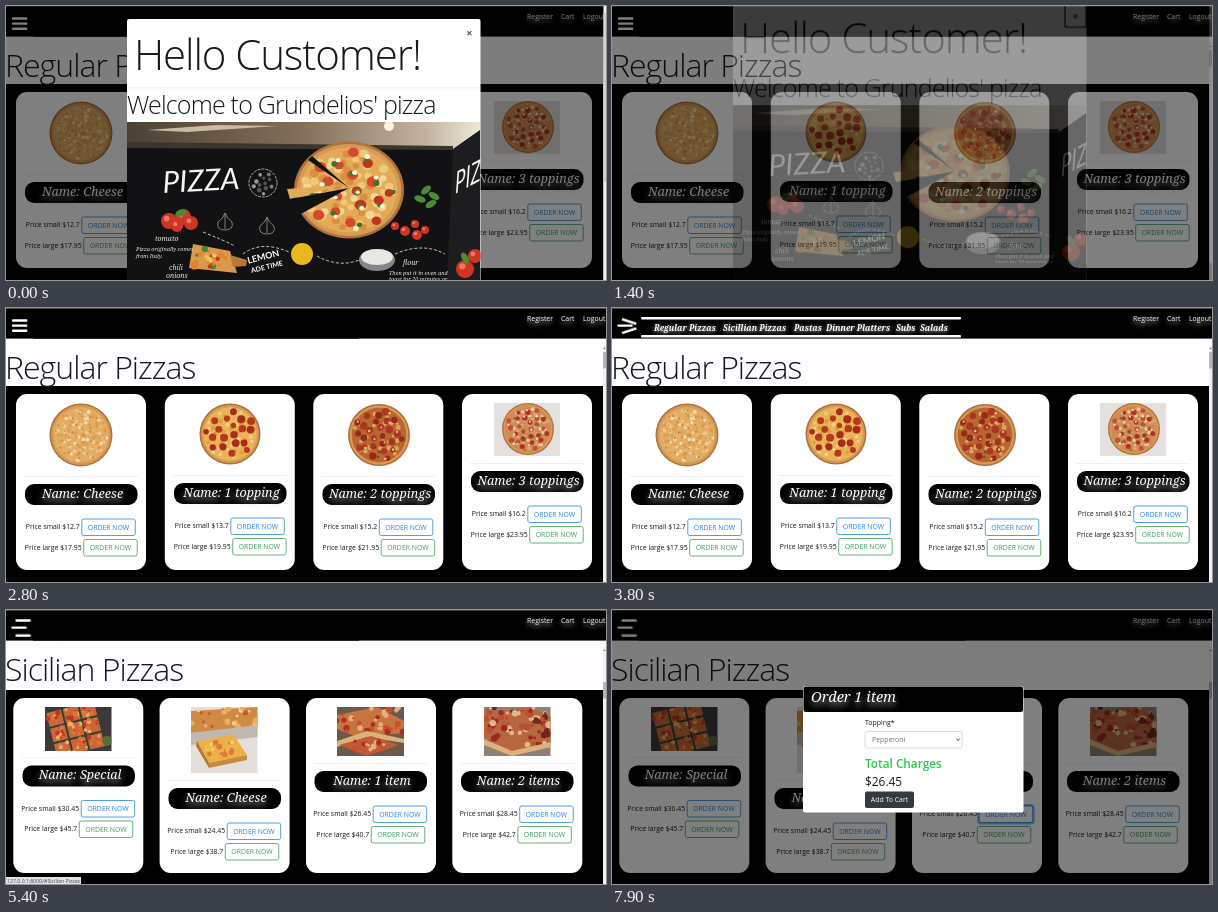
An HTML page that plays this animation: 600 px wide and 274 px high, repeating every 8 s.

```html
<!DOCTYPE html>
<html lang="en">
<head>
<meta charset="utf-8">
<title>Pizza menu</title>
<style>
html, body { margin: 0; width: 100%; height: 100%; overflow: hidden; background: #000; }
svg { display: block; }
#stage { width: 600px; height: 274px; }
text { font-family: "Open Sans", "Noto Sans", sans-serif; font-size: 6.9px; fill: #16191c; white-space: pre; }
.mid { text-anchor: middle; }
.end { text-anchor: end; }
.light { font-weight: 300; }
.title { font-size: 32px; letter-spacing: -1px; }
.script { font-family: "Noto Serif", serif; font-style: italic; font-size: 12.6px; fill: #fff; filter: drop-shadow(0 4px 3px #aaa); }
.menu { font-size: 8.1px; font-weight: 700; filter: drop-shadow(0 1px 2px #bbb); }
.link { fill: #fff; filter: drop-shadow(0 3px 2px #999); }
.chalk { font-family: "Noto Serif", serif; font-style: italic; font-size: 5.5px; fill: #e8e8e8; }
.sign { font: italic 30px Lato, sans-serif; fill: #f4f4f4; }
.bold { font: 700 9px Lato, sans-serif; fill: #fff; }

.anim { animation: 8s linear infinite; }
.step { animation: 8s step-end infinite; }
.bar, .cover { transform-box: fill-box; transform-origin: center; animation: 8s linear infinite; }
.cover { transform-origin: right; animation-name: cover; }
#regular { animation-name: first; }
#sicilian { animation-name: second; }
#thumb { animation-name: thumb; }
#status { animation-name: status; }
#hot { animation-name: hot; }
#ring { animation-name: ring; }
#shade { animation-name: shade; }
#welcome { animation-name: welcome; }
#focus { animation-name: focus; }
#order { animation-name: order; }
#bar0 { animation-name: bar0; }
#bar1 { animation-name: bar1; }
#bar2 { animation-name: bar2; }

@keyframes first { 0% { visibility: visible } 60%, 100% { visibility: hidden } }
@keyframes second { 0% { visibility: hidden } 60%, 100% { visibility: visible } }
@keyframes thumb { 0% { transform: none } 60%, 100% { transform: translateY(28px) } }
@keyframes status { 0% { opacity: 0 } 51.25% { opacity: 1 } 71.25%, 100% { opacity: 0 } }
@keyframes hot { 0% { opacity: 0 } 82.5% { opacity: 1 } 92.5%, 100% { opacity: 0 } }
@keyframes ring { 0% { opacity: 0 } 86.25%, 100% { opacity: 1 } }
@keyframes focus { 0% { opacity: 0 } 13.75%, 100% { opacity: 1 } }
@keyframes shade { 0%, 17.75% { opacity: .5 } 19.75%, 92.5% { opacity: 0 } 94.4%, 100% { opacity: .5 } }
@keyframes welcome {
  0%, 15.6% { opacity: 1; transform: none }
  18.1%, 100% { opacity: 0; transform: translateY(-22px) }
}
@keyframes order {
  0%, 93.1% { opacity: 0; transform: translateY(-22px); animation-timing-function: ease-out }
  96.9%, 100% { opacity: 1; transform: none }
}
@keyframes cover {
  0%, 37.5% { transform: none; animation-timing-function: ease }
  43.75%, 60% { transform: scaleX(0); animation-timing-function: ease }
  66.25%, 100% { transform: none }
}
@keyframes bar0 {
  0%, 37.5% { transform: none }
  43.75%, 60% { transform: translate(3.5px, 1px) rotate(18deg) }
  66.25%, 100% { transform: translate(3.5px, -2px) }
}
@keyframes bar1 { 0%, 37.5% { transform: none } 43.75%, 100% { transform: translateX(-.6px) } }
@keyframes bar2 {
  0%, 37.5% { transform: none }
  43.75%, 60% { transform: translate(3.5px, 0) rotate(-18deg) }
  66.25%, 100% { transform: translate(3.5px, 2.8px) }
}
</style>
</head>
<body>
<svg id="stage" viewBox="0 0 600 274"></svg>
<script>
let seed = 7;
const rnd = () => (seed = (seed * 16807) % 2147483647) / 2147483647;
const pick = list => list[Math.floor(rnd() * list.length)];
const many = (n, fn) => Array.from({ length: n }, (_, i) => fn(i)).join('');

const rect = (x, y, w, h, fill, more = '') =>
  `<rect x="${x}" y="${y}" width="${w}" height="${h}" fill="${fill}" ${more}/>`;
const dot = (x, y, r, fill, more = '') => `<circle cx="${x}" cy="${y}" r="${r}" fill="${fill}" ${more}/>`;
const poly = (points, fill) => `<polygon points="${points}" fill="${fill}"/>`;
const text = (x, y, str, cls = '', css = '') => `<text x="${x}" y="${y}" class="${cls}" style="${css}">${str}</text>`;
const frame = (x, y, w, h, body) => `<svg x="${x}" y="${y}" width="${w}" height="${h}">${body}</svg>`;
const put = (transform, body) => `<g transform="${transform}">${body}</g>`;

const spots = (n, w, h, r, colors) =>
  many(n, () => dot(rnd() * w, rnd() * h, r * (.5 + rnd()), pick(colors)));

// Toppings spread evenly over a disc
const scatter = (cx, cy, R, n, r, colors) => many(n, i => {
  const a = i * 2.4 + rnd() * .3, d = R * Math.sqrt((i + .5) / n);
  return dot(cx + d * Math.cos(a), cy + d * Math.sin(a), r * (.8 + rnd() * .4), pick(colors));
});

const pizza = (cx, cy, r, cheese, layers) =>
  dot(cx, cy, r, '#b0713a') + dot(cx, cy, r * .95, '#d59a55') + dot(cx, cy, r * .88, cheese) +
  layers.map(([n, size, ...colors]) => scatter(cx, cy, r * .82, n, size, colors)).join('');

const button = (x, y, color) =>
  rect(x, y, 53.5, 16.5, 'none', `rx="2" stroke="${color}" stroke-width=".8"`) +
  text(x + 26.75, y + 10.7, 'ORDER NOW', 'mid', `fill:${color}`);

const priceRow = (c, y, size, price, color) => {
  const x = c + (price.length > 5 ? 2.7 : .8);
  return text(x - 2, y + 2.2, `Price ${size} ${price}`, 'end') + button(x, y - 8, color);
};

const card = (x, y, h, c, pill, name, small, large, picture) =>
  rect(x, y, 130, h, '#fff', 'rx="11"') + picture +
  rect(x + 8, pill - 8, 114, .6, '#e6e6e6') +
  rect(c - 56, pill, 112.5, 21, '#000', 'rx="9"') +
  text(c + 1.5, pill + 13.5, 'Name: ' + name, 'mid script') +
  priceRow(c, pill + 43, 'small', small, '#2a86e0') +
  priceRow(c, pill + 63.5, 'large', large, '#3f9f5a');

const heading = (str, bottom) =>
  rect(0, 30, 600, bottom - 30, '#fdfcfe') + text(-1, 70.5, str, 'light title');

function regular() {
  const c = (x, mid, pill, ...rest) => card(x, 86, 176, mid, pill, ...rest);
  return heading('Regular Pizzas', 78) +
    c(10, 75, 176, 'Cheese', '$12.7', '$17.95',
      pizza(75, 127, 31.5, '#e2ac62', [[90, 1.7, '#ecc98a', '#dd9c50', '#f2dcae', '#e6b46b'], [40, .9, '#c9803a']])) +
    c(158.8, 224, 175, '1 topping', '$13.7', '$19.95',
      pizza(224, 126, 30.5, '#eab355', [[50, 1.8, '#f3d085', '#dd9a42'], [19, 3.4, '#b5381f', '#a82c1c']])) +
    c(307.3, 372.5, 176, '2 toppings', '$15.2', '$21.95',
      pizza(373, 127, 31, '#b9652f', [[40, 2.2, '#dca45e', '#bb6a35'], [26, 3.2, '#98271a', '#b03522'], [26, 1.2, '#54532b', '#e4c08a']])) +
    c(456, 521, 163, '3 toppings', '$16.2', '$23.95',
      rect(488, 95, 66, 53, '#e3e0de') +
      pizza(522, 121, 26, '#d08a55', [[40, 1.8, '#ebcda0', '#dca572'], [26, 2.3, '#b13224', '#bf5136'], [20, 1, '#5d6a35', '#f4e8d2']]));
}

function sicilian() {
  const c = (x, mid, pill, ...rest) => card(x, 88, 175, mid, pill, ...rest);
  const warm = ['#d9763a', '#b8391f', '#eab063'], red = ['#a9301f', '#c9502f', '#e3b080'];
  const tray = frame(39, 97, 66.5, 44, rect(0, 0, 67, 44, '#3c393b') +
    put('rotate(-14 33 22)', many(9, i => put(`translate(${6 + i % 3 * 17} ${-1 + Math.floor(i / 3) * 16})`,
      rect(0, 0, 15, 14, '#b9743a') + rect(1, 1, 13, 12, '#cf6434') + spots(9, 14, 13, 1.7, warm)))) +
    dot(62, 34, 5, '#5b6a3b'));
  const slice = frame(185, 97, 66.5, 66, rect(0, 0, 67, 66, '#e4dfdb') +
    poly('0,4 67,0 67,20 0,26', '#cf8a45') + spots(26, 67, 20, 2.2, ['#e8b060', '#c95a2c', '#eed09a']) +
    poly('0,26 67,18 67,30 0,38', '#c0b8b2') +
    poly('6,34 42,27 56,48 18,56', '#eab04a') + poly('6,34 18,56 18,61 5,39', '#b87432') +
    poly('18,56 56,48 56,53 18,61', '#c88a3f') +
    put('translate(15 33)', spots(22, 30, 17, 2, ['#f3cd72', '#dc7d35', '#f0b94e'])));
  const board = frame(331, 97, 67, 49, rect(0, 0, 67, 49, '#6b5a4b') + poly('0,8 40,0 67,14 67,26 20,30 0,22', '#c8743f') +
    spots(34, 67, 25, 2.3, red) + poly('0,34 30,24 67,32 67,36 30,30 0,40', '#ddb27a') +
    poly('2,38 34,29 62,38 30,49', '#c25a35') +
    put('translate(16 33)', spots(16, 34, 10, 2, red)));
  const loaded = frame(478, 97, 66.5, 49, rect(0, 0, 67, 49, '#8f7f74') + poly('0,6 46,0 67,10 67,36 28,46 0,30', '#b8663e') +
    spots(70, 67, 38, 2.4, ['#9a2a1e', '#73261c', '#e0b78f', '#b94f33']) +
    poly('0,32 28,44 67,35 67,40 28,49 0,38', '#dcb27e'));
  const hotX = 367.2, hotY = 196;
  return heading('Sicilian Pizzas', 80) +
    c(7.3, 72.5, 155.5, 'Special', '$30.45', '$45.7', tray) +
    c(153.6, 218.5, 178, 'Cheese', '$24.45', '$38.7', slice) +
    c(300, 364.5, 161, '1 item', '$26.45', '$40.7', board) +
    c(446.3, 511, 161, '2 items', '$28.45', '$42.7', loaded) +
    group('ring', 'step', rect(hotX - 1, hotY - 1, 55.5, 18.5, 'none', 'rx="3" stroke="#007bff" stroke-opacity=".5" stroke-width="2"')) +
    group('hot', 'step', rect(hotX, hotY, 53.5, 16.5, '#007bff', 'rx="2"') +
      text(hotX + 26.75, hotY + 10.7, 'ORDER NOW', 'mid', 'fill:#fff'));
}

function header() {
  const items = [[42, 'Regular Pizzas'], [111, 'Sicillian Pizzas'], [182, 'Pastas'],
    [214, 'Dinner Platters'], [284, 'Subs'], [308, 'Salads']];
  return rect(0, 0, 600, 30.6, '#000') + rect(0, 0, 600, .8, '#555') +
    rect(29, 9, 320, 2.6, '#fff', 'rx="1"') + rect(29, 27, 320, 2.6, '#fff', 'rx="1"') +
    items.map(([x, s]) => text(x, 22.5, s, 'script menu')).join('') +
    rect(27, 6, 326, 24.6, '#000', 'class="cover"') +
    many(3, i => rect(6, 11.3 + i * 5.1, 15.3, 2.4, '#fff', `rx=".8" class="bar" id="bar${i}"`)) +
    text(521, 13, 'Register', 'link') + text(555, 13, 'Cart', 'link') + text(577, 13, 'Logout', 'link');
}

function wall() {
  const black = '#121214';
  const tomato = (x, y, r) => dot(x, y, r, '#cf3524') + dot(x - r * .3, y - r * .3, r * .35, '#ee7a5e');
  const leaf = (x, y, a) => `<ellipse cx="${x}" cy="${y}" rx="6" ry="3.2" fill="#4c8a35" transform="rotate(${a} ${x} ${y})"/>`;
  const stroke = d => `<path d="${d}" fill="none" stroke="#ddd" stroke-width=".9" stroke-dasharray="3 2"/>`;
  const garlic = (x, y) => `<path d="M${x},${y - 9}q-2,6 -7,9q-2,8 7,8q9,0 7,-8q-5,-3 -7,-9v16" fill="none" stroke="#999" stroke-width=".8"/>`;
  const ceiling = '<linearGradient id="ceiling"><stop stop-color="#4c4135"/><stop offset=".5" stop-color="#83705b"/>' +
    '<stop offset=".85" stop-color="#c3b4a1"/><stop offset="1" stop-color="#efe8dc"/></linearGradient>';
  return ceiling + rect(0, 0, 353, 158, black) +
    poly('0,0 353,0 353,8 326,27 0,25', 'url(#ceiling)') + poly('0,20 326,24 326,28 0,26', '#3d342b') +
    poly('20,8 90,3 150,4 60,10', '#cbbba5') + dot(262, 4, 5, '#fff6e6') +
    poly('326,28 353,9 353,158 320,158', '#1d1d20') +
    put('rotate(-3 36 71)', text(36, 71, 'PIZZA', 'sign')) +
    put('translate(328 72) skewY(-28) scale(.62 1)', text(0, 0, 'PIZZA', 'sign')) +
    dot(136, 61, 14, 'none', 'stroke="#aaa" stroke-dasharray="3 1"') +
    scatter(136, 61, 11, 12, 2, ['#555', '#777', '#999']) +
    put('translate(222 68) scale(1 .88)',
      pizza(0, 0, 55, '#e3ab58', [[60, 4, '#f3d796', '#d98e42', '#f0c878'], [17, 5.2, '#c2331f', '#d44b2c'], [14, 2.8, '#4f8a35', '#3f742c'], [12, 2.5, '#fbeecb']])) +
    poly('222,66 170,94 158,78', black) + poly('222,66 181,38 185,34', black) +
    put('translate(-3 -3)', poly('218,66 166,80 163,70', '#e3ab58')) +
    tomato(42, 99, 8) + tomato(56, 95, 8) + tomato(64, 101, 7) + tomato(50, 104, 6) + leaf(54, 91, -20) +
    garlic(98, 100) + garlic(140, 104) +
    poly('66,122 103,129 110,151 62,146', '#d99a4e') + poly('103,133 120,138 119,144 106,145', '#b87835') +
    put('translate(67 126)', spots(22, 35, 19, 2.6, ['#c53b25', '#e5822f', '#4d8435', '#f0c15b'])) +
    leaf(299, 68, -40) + leaf(307, 74, 30) + leaf(293, 77, 20) + leaf(304, 82, -30) +
    tomato(268, 104, 4) + tomato(278, 109, 5) + tomato(288, 102, 4) + tomato(290, 113, 5) + tomato(298, 108, 4) +
    tomato(338, 147, 9) + tomato(348, 134, 7) + leaf(338, 136, 60) +
    '<ellipse cx="250" cy="138" rx="18" ry="11" fill="#85858a"/><ellipse cx="250" cy="135" rx="16" ry="8" fill="#e9e7e2"/>' +
    put('rotate(-14 136 139)', text(121, 138, 'LEMON', 'bold') + text(122, 148, 'ADE TIME', 'bold', 'font-size:7px')) +
    dot(175, 132, 11, '#e8b820') +
    stroke('M76,110 Q96,118 108,124') + stroke('M116,132 Q134,118 162,130') + stroke('M190,134 Q212,146 232,138') +
    stroke('M268,132 Q296,120 318,132') +
    text(28, 119, 'tomato', 'chalk', 'font-size:7px') + text(9, 129, 'Pizza originally comes', 'chalk') +
    text(9, 136, 'from Italy.', 'chalk') + text(42, 148, 'chili', 'chalk', 'font-size:7px') +
    text(39, 156, 'onions', 'chalk', 'font-size:7px') + text(276, 143, 'flour', 'chalk', 'font-size:7px') +
    text(262, 153, 'Then put it in oven and', 'chalk') + text(262, 159, 'toast for 20 minutes or', 'chalk');
}

const welcome = () =>
  rect(597.5, 0, 2.5, 274, '#f4f4f4') + rect(597.5, 6, 2.5, 170, '#d2d2d2') +
  rect(121, 13, 353.5, 280, '#fff', 'rx="2"') + rect(121, 81.5, 353.5, .7, '#e3e6e9') +
  text(128, 63.5, 'Hello Customer!', 'light', 'font-size:42px;letter-spacing:-1.1px') +
  text(121, 108, "Welcome to Grundelios' pizza", 'light', 'font-size:25px;letter-spacing:-.8px') +
  text(463.3, 30.5, '×', 'mid', 'font-size:11px;font-weight:700;fill:#555') +
  group('focus', 'step', rect(453, 14, 21, 24, 'none', 'rx="2" stroke="#111" stroke-width="1.2"')) +
  frame(121, 116, 353.5, 158, wall()) + rect(121, 274, 353.5, 30, '#121214');

const order = () =>
  rect(191, 76, 220.5, 126.5, '#fff', 'rx="2.5"') +
  rect(191.5, 76.5, 219.5, 25.5, '#000', 'rx="2"') +
  text(199, 91.5, 'Order 1 item', 'script', 'font-size:14.5px') +
  text(253, 115, 'Topping*') +
  rect(253, 121.5, 97, 16.5, '#fff', 'rx="2" stroke="#ced4da" stroke-width=".8"') +
  text(260, 132, 'Pepperoni', '', 'fill:#6a7077') +
  '<path d="M344.5,128.5l1.7,2l1.7,-2" fill="none" stroke="#343a40" stroke-width=".9"/>' +
  text(253, 158, 'Total Charges', '', 'font-size:11.8px;font-weight:600;fill:#2bc94b') +
  text(253, 176, '$26.45', '', 'font-size:11.9px') +
  rect(253, 181.5, 49, 16.5, '#343a40', 'rx="2"') +
  text(277.5, 192.3, 'Add To Cart', 'mid', 'fill:#fff');

const group = (id, cls, body) => `<g id="${id}" class="${cls}">${body}</g>`;

document.getElementById('stage').innerHTML =
  rect(0, 0, 600, 274, '#000') +
  group('regular', 'step', regular()) +
  group('sicilian', 'step', sicilian()) +
  rect(597, 37, 3, 237, '#f1f1f1') +
  '<path d="M597.4,41l1.2,-1.6l1.2,1.6z" fill="#666"/>' +
  group('thumb', 'step', rect(597, 44, 3, 16.5, '#b5b5b5')) +
  header() +
  group('status', 'step', rect(0, 267, 75, 7, '#dee1e6') + text(1, 272.5, '127.0.0.1:8000/#Sicilian Pizzas', '', 'font-size:5.2px;fill:#444')) +
  rect(0, 0, 600, 274, '#000', 'id="shade" class="anim"') +
  group('welcome', 'anim', welcome()) +
  group('order', 'anim', order());
</script>
</body>
</html>
```
